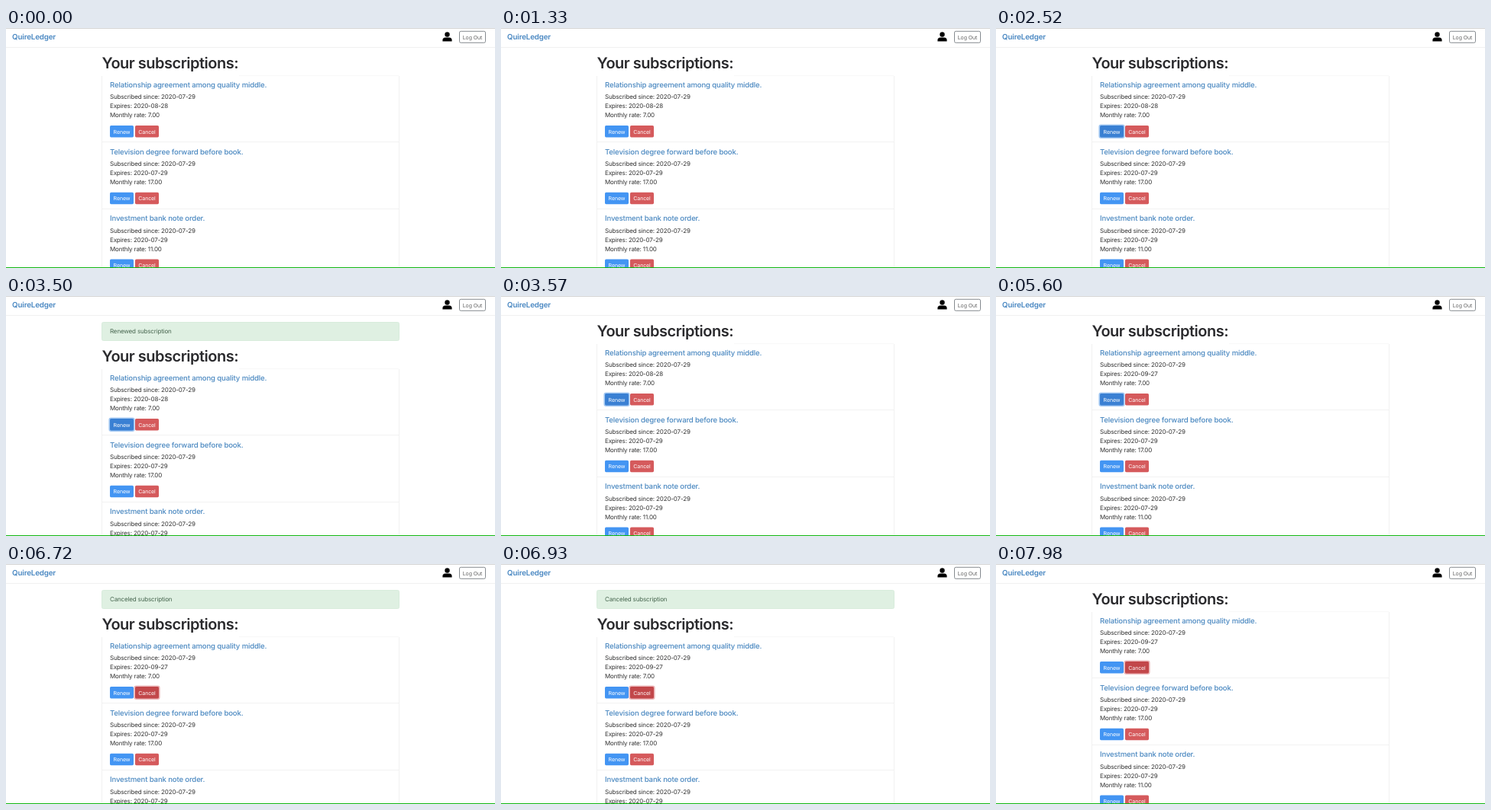
Write an HTML page that moves like this. It is 640x315 px and loops after 8000 ms.

```html
<!DOCTYPE html>
<html lang="en">
<head>
<meta charset="utf-8">
<title>Subscriptions</title>
<style>
  html, body { margin: 0; height: 100%; overflow: hidden; background: #fff; }
  svg { display: block; width: 100%; height: 100%; }
  text { font: 400 8px Inter, sans-serif; letter-spacing: -.16px; fill: #333; text-rendering: geometricPrecision; }
  .brand { font-weight: 600; font-size: 9.8px; fill: #4a88c2; }
  .heading { font-weight: 600; font-size: 20px; letter-spacing: -.49px; fill: #2b2b2e; }
  .title { font-weight: 500; font-size: 9.6px; letter-spacing: -.15px; fill: #4a88c0; }
  .label { font-size: 7px; letter-spacing: -.1px; text-anchor: middle; fill: #fff; }
  .logout { fill: #666; }
  .notice { fill: #47664f; }
  .line { fill: none; stroke: #f1f1f1; }
  .renew { fill: #4395f3; }
  .cancel { fill: #d55a5c; }
  .focused { stroke-width: 3.2; paint-order: stroke; }
  .renew.focused { fill: #3a80d3; stroke: #a3c8f2; }
  .cancel.focused { fill: #c2474a; stroke: #ecb4b6; }
</style>
</head>
<body>
<svg viewBox="0 0 640 315" preserveAspectRatio="none">
  <rect width="640" height="315" fill="#fff"/>
  <g id="alert">
    <rect x="125.5" y="34.5" width="389" height="24" rx="2" fill="#dff0e2" stroke="#d8ecdc"/>
    <text id="notice" class="notice" x="136" y="49.4"></text>
  </g>
  <g id="page">
    <text class="heading" x="125.6" y="53">Your subscriptions:</text>
    <path class="line" d="M125.5 330V63M514.5 330V63"/>
    <path d="M305 62.5H514" stroke="#f8f8f8"/>
    <g id="list"></g>
  </g>
  <path class="line" d="M0 25.5H640"/>
  <path d="M0 .5H640" stroke="#d4d4d4"/>
  <text class="brand" x="8" y="15.2">QuireLedger</text>
  <circle cx="577.5" cy="8.5" r="3.2"/>
  <path d="M571.4 17.6V16Q571.4 12.6 575 12.4H580Q583.6 12.6 583.6 16V17.6Z"/>
  <rect x="593.5" y="4.3" width="34" height="15" rx="1.8" fill="none" stroke="#858a8f"/>
  <text class="label logout" x="610.5" y="14.6">Log Out</text>
  <rect y="314" width="640" height="1" fill="#12b812"/>
</svg>
<script>
const LOOP = 8000, ITEM_HEIGHT = 87.8, ALERT_SHIFT = 33;
const RENEW_FOCUS = 2450, DATE_UPDATE = 4130, CANCEL_FOCUS = 6580;
const alerts = [
  { from: 2590, to: 3570, text: "Renewed subscription" },
  { from: 6720, to: 7700, text: "Canceled subscription" }
];
const subscriptions = [
  ["Relationship agreement among quality middle.", "2020-08-28", "7.00"],
  ["Television degree forward before book.", "2020-07-29", "17.00"],
  ["Investment bank note order.", "2020-07-29", "11.00"]
];
const $ = id => document.getElementById(id);

const button = (kind, x, label) => `
  <rect class="${kind}" x="${x}" y="128" width="31" height="15.4" rx="1.6"/>
  <text class="label" x="${x + 15.5}" y="138.5">${label}</text>`;

$("list").innerHTML = subscriptions.map(([title, expires, rate], i) => `
  <g transform="translate(0 ${i * ITEM_HEIGHT})">
    <text class="title" x="136" y="77.8">${title}</text>
    <text x="136" y="93.4">Subscribed since: 2020-07-29</text>
    <text class="expires" x="136" y="105.4">Expires: ${expires}</text>
    <text x="136" y="117.4">Monthly rate: ${rate}</text>
    ${button("renew", 136, "Renew")}
    ${button("cancel", 169, "Cancel")}
    <path class="line" d="M126 149.6H514"/>
  </g>`).join("");

const [renew, cancel, expires] = [".renew", ".cancel", ".expires"].map(s => document.querySelector(s));

function draw(t) {
  const alert = alerts.find(a => t >= a.from && t < a.to);
  $("alert").setAttribute("visibility", alert ? "visible" : "hidden");
  $("notice").textContent = alert ? alert.text : "";
  $("page").setAttribute("transform", `translate(0 ${alert ? ALERT_SHIFT : 0})`);
  renew.classList.toggle("focused", t >= RENEW_FOCUS && t < CANCEL_FOCUS);
  cancel.classList.toggle("focused", t >= CANCEL_FOCUS);
  expires.textContent = "Expires: " + (t < DATE_UPDATE ? "2020-08-28" : "2020-09-27");
}

const start = performance.now();
function tick() {
  draw((performance.now() - start) % LOOP);
  requestAnimationFrame(tick);
}
tick();
</script>
</body>
</html>
```
